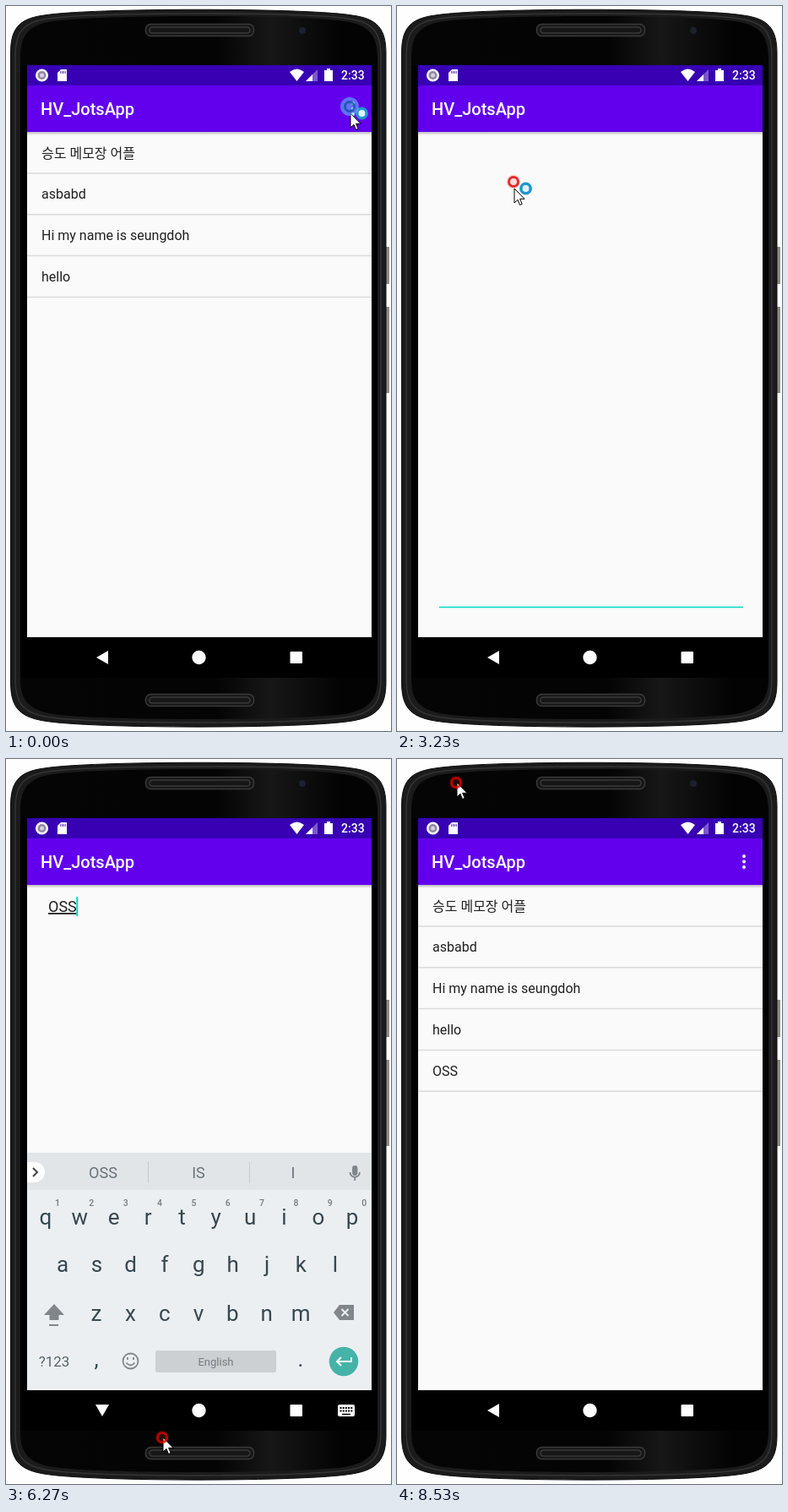
An HTML page for the animation above (8560 ms loop, 456x858 px).

```html
<!DOCTYPE html>
<html lang="en">
<head>
<meta charset="utf-8">
<title>Note app demo</title>
<style>
  html, body { margin: 0; width: 100%; height: 100%; overflow: hidden; background: #fefefe; }
  svg { display: block; width: 456px; height: 858px; font-family: Roboto, "Noto Sans CJK KR", "Noto Sans CJK", sans-serif; }
  .mid { text-anchor: middle; }
  .row { font-size: 16px; fill: #202020; }
</style>
</head>
<body>
<svg viewBox="0 0 456 858">
  <defs>
    <linearGradient id="face">
      <stop offset="0" stop-color="#050505"/><stop offset=".55" stop-color="#040404"/>
      <stop offset=".7" stop-color="#171717"/><stop offset=".9" stop-color="#030303"/>
    </linearGradient>
    <linearGradient id="shade" x2="0" y2="1">
      <stop offset="0" stop-color="#000" stop-opacity=".25"/><stop offset="1" stop-color="#000" stop-opacity="0"/>
    </linearGradient>
    <clipPath id="screen"><path d="M25 149H433V747H25Z"/></clipPath>
  </defs>

  <!-- phone -->
  <path fill="#8c8a86" d="M449 285h5v44h-5zM449 356h5v102h-5z"/>
  <path fill="#1b1b1c" stroke="#0c0c0c" d="M5.500 56C5.500 28 14 15 45 11C100 2 355 2 410 11C441 15 450 28 450 56V800C450 828 441 841 410 846C355 855.500 100 855.500 45 846C14 841 5.500 828 5.500 800Z"/>
  <path fill="none" stroke="#343436" stroke-width="1.500" d="M11 60C11 32 19 19 50 15C105 7 350 7 405 15C436 19 444 32 444 60V796C444 824 436 837 405 841.500C350 850 105 850 50 841.500C19 837 11 824 11 796Z"/>
  <path fill="url(#face)" d="M17 62C17 36 25 22 56 18C110 10 346 10 400 18C431 22 440 36 440 62V796C440 820 431 833 400 838C346 846 110 846 56 838C25 833 17 820 17 796Z"/>
  <path d="M17 70H440V795H17Z"/>
  <g fill="#161616" stroke="#3a3a3b" stroke-width="1.500">
    <rect x="165.500" y="21.500" width="128" height="14" rx="6"/><rect x="170" y="25" width="119" height="7" rx="3.500"/>
    <rect x="165.500" y="814.500" width="128" height="14" rx="6"/><rect x="170" y="818" width="119" height="7" rx="3.500"/>
  </g>
  <circle cx="351" cy="29" r="4" fill="#1c2130"/>

  <!-- status and title bars -->
  <path fill="#fafafa" d="M25 149H433V747H25Z"/>
  <path fill="#3700b3" d="M25 70H433V94H25Z"/>
  <path fill="#6200ee" d="M25 94H433V149H25Z"/>
  <g fill="#fff">
    <circle cx="42.500" cy="82" r="7.500"/><circle cx="42.500" cy="82" r="5" fill="#8f86a0"/><circle cx="42.500" cy="82" r="2.500" fill="#d5d0dc"/>
    <path d="M65 75h7v14h-11V79z"/>
    <path fill="#3700b3" d="M64.500 77h1v3h-1zM67 77h1v3h-1zM69.500 77h1v3h-1z"/>
    <path d="M336 78Q344.500 71 353 78L344.500 89Z"/>
    <path opacity=".35" d="M369 75V89H355Z"/><path d="M363 81V89H355Z"/>
    <path d="M380 74h4v2h3v13h-10V76h3z"/>
    <text x="397" y="87" font-size="14" font-weight="500">2:33</text>
    <text x="41" y="129" font-size="20" font-weight="500">HV_JotsApp</text>
  </g>

  <g id="list">
    <g id="rows"></g>
    <g fill="#fff"><circle cx="411" cy="115" r="2"/><circle cx="411" cy="121.500" r="2"/><circle cx="411" cy="128" r="2"/></g>
    <g id="menu">
      <rect x="233" y="98" width="197" height="50" rx="3" opacity=".25"/>
      <rect x="234" y="97" width="195" height="48" rx="2" fill="#fff"/>
      <text class="row" x="250" y="127">Add note</text>
    </g>
  </g>

  <g clip-path="url(#screen)">
    <g id="editor">
      <path fill="#fafafa" d="M25 149H433V747H25Z"/>
      <path stroke="#03dac5" stroke-width="1.700" d="M50 711.500H410"/>
      <text id="note" x="50" y="181" font-size="18" fill="#202020"></text>
      <path id="caret" stroke="#03dac5" stroke-width="2" d="M0 163V186"/>
    </g>
  </g>
  <path fill="url(#shade)" d="M25 149H433V153H25Z"/>

  <!-- keyboard -->
  <g id="keyboard" fill="#37474f">
    <path fill="#eceff1" d="M25 510H433V747H25Z"/>
    <path fill="#e1e5e8" d="M25 466H433V510H25Z"/>
    <path fill="#fff" d="M25 477H34a12 12 0 0 1 0 24H25Z"/>
    <path fill="none" stroke="#444" stroke-width="2" d="M32 484l5 5-5 5"/>
    <g id="words" class="mid" font-size="18">
      <path stroke="#c4cacd" d="M168.500 477V502M288.500 477V502"/>
      <text x="115" y="496"></text><text x="228" y="496"></text><text x="340" y="496"></text>
    </g>
    <g fill="none" stroke="#80868a" stroke-width="1.800">
      <rect x="411" y="482" width="4.500" height="10" rx="2.200" fill="#80868a"/>
      <path d="M407.500 489a5.700 5.700 0 0 0 11.400 0M413.200 495v4"/>
    </g>
    <g id="keys" class="mid" font-size="26"></g>
    <path fill="#80868a" d="M57 645L69 658H62.500V664H51.500V658H45ZM51 669h11v2h-11zM395 646H412V664H395L388 655Z"/>
    <path stroke="#eceff1" stroke-width="2" d="M397.500 651l8 8m0-8l-8 8"/>
    <text class="mid" x="57" y="719" font-size="17" fill="#596469">?123</text>
    <g fill="none" stroke="#80868a" stroke-width="1.800"><circle cx="147.500" cy="712.500" r="9"/><path d="M142.500 714.500q5 6 10 0M144 708v3M151 708v3"/></g>
    <rect x="177" y="700" width="143" height="26" rx="2" fill="#cdd0d2"/>
    <text class="mid" x="248.500" y="718" font-size="13" fill="#747b7f">English</text>
    <circle cx="400" cy="713" r="17.300" fill="#45b3a8"/>
    <path fill="none" stroke="#fff" stroke-width="2" d="M409 708V713H392M397 708l-5 5 5 5"/>
  </g>

  <!-- navigation -->
  <ellipse id="ripple" cx="114" cy="772" rx="54" ry="23" fill="#fff"/>
  <g fill="#fff">
    <path id="back"/>
    <circle cx="228.500" cy="771" r="8.200"/><rect x="336.500" y="764" width="14.500" height="14" rx="1"/>
    <g id="switcher">
      <rect x="393" y="764" width="20" height="14" rx="2"/>
      <path stroke="#000" stroke-width="2" stroke-dasharray="2 1.200" d="M395.500 768H411M395.500 771.500H411"/><path stroke="#000" stroke-width="1.500" d="M398 775.500h10"/>
    </g>
  </g>

  <!-- pointer -->
  <g id="pointer">
    <path fill="#fff" stroke="#000" d="M0 0V17L4 13.300L6.500 19.500L9.200 18.300L6.600 12.300H12Z"/>
    <circle id="busy" cx="13.500" cy="0" r="5.700" fill="#dff4ff" stroke="#2196cc" stroke-width="3.500"/>
    <g id="ring"><circle id="halo" r="8.500"/><circle id="band" r="5.500" fill="none" stroke-width="3" stroke-opacity=".8"/></g>
  </g>
</svg>
<script>
const LOOP = 8560;
const OPEN = 2350, CLOSE = 7800;
const presses = [0, 1780, 3350, 7130, 7650];
const strokes = [4700, 4950, 5150];
const blinkStarts = [OPEN, presses[2], ...strokes];

const $ = id => document.getElementById(id);
const ramp = (t, a, b) => Math.max(0, Math.min(1, (t - a) / (b - a)));
const ease = x => x * x * (3 - 2 * x);
const show = (id, on) => $(id).setAttribute('opacity', +on);
const move = (id, x, y) => $(id).setAttribute('transform', `translate(${x} ${y})`);

// time, x, y of the arrow tip
const path = [
  [0, 408, 127], [450, 408, 127], [1100, 300, 131], [1900, 300, 131], [2150, 289, 206],
  [2700, 139, 216], [5400, 139, 216], [6150, 186, 803], [6300, 186, 803], [6850, 113, 767],
  [7800, 113, 767], [8530, 71, 28], [LOOP, 71, 28]
];

const notes = ['승도 메모장 어플', 'asbabd', 'Hi my name is seungdoh', 'hello', 'OSS'];
$('rows').innerHTML = notes.map((text, i) => {
  const y = 149 + 48.8 * i;
  return `<g><text class="row" x="42" y="${y + 30.5}">${text}</text>
    <path stroke="#dadada" stroke-width="1.500" d="M25 ${y + 49}H433"/></g>`;
}).join('');
const lastRow = $('rows').lastElementChild;

const keyRow = (letters, x, y) => [...letters].map((c, i) =>
  `<text x="${x + 40.35 * i}" y="${y}">${c}</text>`).join('');
$('keys').innerHTML = keyRow('qwertyuiop', 47, 551) + keyRow('asdfghjkl', 67, 607) +
  keyRow('zxcvbnm', 107, 665) + keyRow(',', 107, 719) + keyRow('.', 349, 719) +
  `<g font-size="10.500" font-weight="500" fill="#747b7f">${keyRow('1234567890', 61, 529)}</g>`;

function pointerAt(t) {
  const i = path.findIndex(p => p[0] > t);
  const [t0, x0, y0] = path[i - 1], [t1, x1, y1] = path[i];
  const k = ease(ramp(t, t0, t1));
  return [x0 + (x1 - x0) * k, y0 + (y1 - y0) * k];
}

function drawList(t) {
  show('menu', Math.min(ramp(t, 200, 380), 1 - ramp(t, 1950, 2200)));
  show('list', t < OPEN + 200 || t >= CLOSE);
  lastRow.setAttribute('opacity', +(t >= 1950));
  lastRow.firstElementChild.textContent = t >= CLOSE ? 'OSS' : '';
}

function drawEditor(t) {
  const shown = Math.min(ramp(t, OPEN, OPEN + 200), 1 - ramp(t, CLOSE, CLOSE + 200));
  show('editor', shown);
  move('editor', 0, 25 * (1 - ease(shown)));
  const count = strokes.filter(s => s <= t).length;
  const note = $('note');
  note.textContent = 'OSS'.slice(0, count);
  note.setAttribute('text-decoration', t < 7260 ? 'underline' : 'none');
  const since = t - Math.max(OPEN, ...blinkStarts.filter(s => s <= t));
  show('caret', since % 1000 < 500);
  move('caret', 50.5 + (count ? note.getComputedTextLength() : 0), 0);

  const words = [['I', 'The', "I'm"], ['Os', 'Is', 'I'], ['OSS', 'IS', 'I'], ['OSS', 'IS', 'I']][count];
  document.querySelectorAll('#words text').forEach((el, i) => {
    const bold = count === 1 && i === 1;
    el.textContent = words[i];
    el.setAttribute('font-weight', bold ? 700 : 400);
    el.setAttribute('fill', bold ? '#000' : '#697378');
  });
}

function drawKeyboard(t) {
  const shown = Math.min(ramp(t, 3550, 3800), 1 - ramp(t, 7260, 7460));
  const active = t >= 3550 && t < 7260;
  show('keyboard', shown);
  move('keyboard', 0, 53 * (1 - shown));
  show('words', active);
  show('switcher', active);
  $('back').setAttribute('d', active ? 'M106 764H122L114 778Z' : 'M107 771L121 763V779Z');
  const press = t < presses[4] ? presses[3] : presses[4];
  show('ripple', t < press ? 0 : 0.16 * (1 - ramp(t, press + 200, press + 500)));
}

function drawPointer(t) {
  const busy = t < 3400, pressed = presses.some(p => t >= p && t < p + 120);
  move('pointer', ...pointerAt(t));
  show('busy', busy);
  move('ring', -1, busy ? -8 : 0);
  $('halo').setAttribute('r', pressed ? 11 : 8.5);
  $('halo').setAttribute('fill', pressed ? '#60d0ff' : '#ff2010');
  $('halo').setAttribute('opacity', pressed ? 0.55 : 0.13);
  $('band').setAttribute('stroke', pressed ? '#1450a8' : '#dd0000');
}

const start = performance.now();
function frame() {
  const t = (performance.now() - start) % LOOP;
  drawList(t);
  drawEditor(t);
  drawKeyboard(t);
  drawPointer(t);
  requestAnimationFrame(frame);
}
frame();
</script>
</body>
</html>
```
